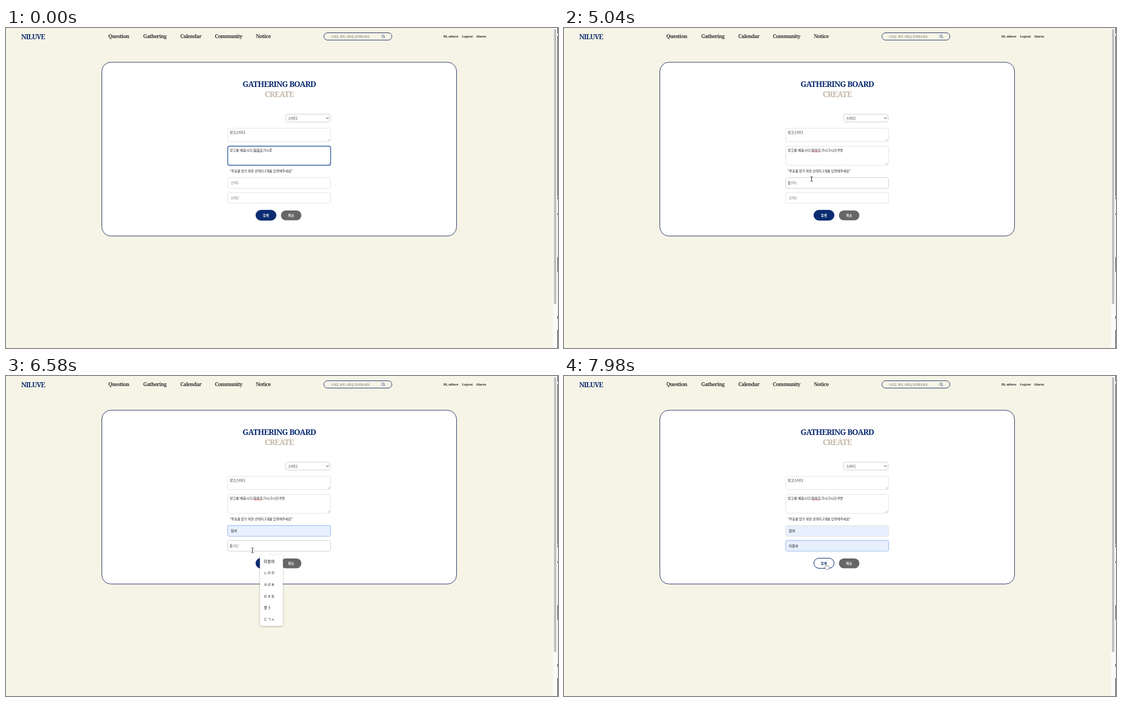
Recreate the animation shown at these times as an HTML page with a canvas. Size 982 by 570 pixels, loop 8000 ms.

```html
<!DOCTYPE html>
<html lang="ko">
<head>
<meta charset="utf-8">
<title>Gathering board</title>
<style>
html, body { margin: 0; width: 100%; height: 100%; overflow: hidden; background: #f6f4e6; }
canvas { display: block; width: 982px; height: 570px; }
</style>
</head>
<body>
<canvas id="stage" width="982" height="570"></canvas>
<script>
const ctx = document.getElementById('stage').getContext('2d');
const LOOP = 8000, STEP = 70;
const NAVY = '#0c2c72', INK = '#222', CREAM = '#f6f4e6', FILLED = '#e8f0fe';
const SANS = '"Noto Sans CJK KR", "Noto Sans CJK", "Noto Sans", sans-serif';
const SERIF = '"Noto Serif", serif';

const clamp = v => Math.max(0, Math.min(1, v));
const ramp = (t, from, span = 140) => clamp((t - from) / span);
const between = (t, a, b) => t >= a && t < b;

function box(x, y, w, h, r, fill, stroke, line = 1) {
  ctx.beginPath();
  ctx.roundRect(x, y, w, h, r);
  if (fill) { ctx.fillStyle = fill; ctx.fill(); }
  if (stroke) { ctx.strokeStyle = stroke; ctx.lineWidth = line; ctx.stroke(); }
}

function text(str, x, y, size, o = {}) {
  ctx.font = `${o.weight || 400} ${size}px ${o.font || SANS}`;
  ctx.letterSpacing = `${o.gap || 0}px`;
  ctx.textAlign = o.align || 'left';
  ctx.textBaseline = 'alphabetic';
  ctx.fillStyle = o.color || INK;
  ctx.fillText(str, x, y);
  const w = ctx.measureText(str).width;
  ctx.letterSpacing = '0px';
  return w;
}

function lines(points, color, width) {
  ctx.beginPath();
  points.forEach(([x, y], i) => i ? ctx.lineTo(x, y) : ctx.moveTo(x, y));
  ctx.strokeStyle = color;
  ctx.lineWidth = width;
  ctx.stroke();
}

function caret(x, y) {
  ctx.fillStyle = '#000';
  ctx.fillRect(x, y, 0.8, 7);
}

function header() {
  const bold = { font: SERIF, weight: 800 };
  text('NILUVE', 27, 20, 12, { ...bold, color: NAVY, gap: -0.9 });
  const nav = { Question: 182, Gathering: 244, Calendar: 310, Community: 371.5, Notice: 444.5 };
  for (const name in nav) text(name, nav[name], 18.3, 9, { ...bold, color: '#333', gap: -0.5 });
  box(565.5, 8.5, 121, 13, 6.5, null, '#2a3a72');
  text('닉네임, 제목, 내용을 검색해보세요', 578, 17.2, 4.9, { color: '#777' });
  ctx.beginPath();
  ctx.arc(670.7, 14.5, 2.2, 0, 7);
  ctx.strokeStyle = NAVY;
  ctx.lineWidth = 0.7;
  ctx.stroke();
  lines([[672.3, 16.1], [674.4, 18.2]], NAVY, 0.8);
  const user = { 'Hi, niluve': 778, Logout: 811, Alarm: 836 };
  for (const name in user) text(name, user[name], 17.2, 6, { font: SERIF, weight: 600, color: '#333', gap: -0.3 });
}

function scrollbar() {
  ctx.fillStyle = '#fafafa';
  ctx.fillRect(973, 0, 8, 570);
  box(974.7, 2, 4.3, 490, 2.2, '#c1c1c1');
  ctx.fillStyle = '#e6e6e6';
  ctx.fillRect(981, 0, 1, 570);
  ctx.fillStyle = '#333';
  for (const [y, h] of [[0, 10], [14, 286], [301, 4], [330, 3], [408, 26], [513, 5], [538, 32]])
    ctx.fillRect(981, y, 1, h);
}

function grip(x, y) {
  lines([[x - 4, y], [x, y - 4]], '#888', 0.6);
  lines([[x - 2, y], [x, y - 2]], '#888', 0.6);
}

function page() {
  ctx.fillStyle = CREAM;
  ctx.fillRect(0, 0, 982, 570);
  header();
  scrollbar();
  box(170.5, 61, 631, 309.5, 16, '#fff', '#2a3768');
  const title = { font: SERIF, weight: 800, align: 'center', gap: -0.8 };
  text('GATHERING BOARD', 486, 104.8, 14, { ...title, color: NAVY });
  text('CREATE', 486, 122.8, 14, { ...title, color: '#c6b8a8' });
  box(497.5, 153.5, 79, 14, 3, '#fff', '#ccd0d4');
  text('스터디', 502, 162.6, 6);
  lines([[569.5, 159.3], [571.8, 161.6], [574.1, 159.3]], '#333', 1);
  box(394.5, 178.5, 183, 24, 3, '#fff', '#e4e5e7');
  text('장고스터디', 398, 188.3, 6);
  grip(576, 201.5);
  text('*투표를 받기 위한 선택지 2개를 입력해주세요*', 398, 256.7, 5.85);
}

const typed = [
  [0, ''], [980, '2'], [1260, '2ㅅ'], [1330, '2시'], [1400, '2식'], [1540, '2시가'],
  [1680, '2시간'], [2240, '2시간/'], [3640, '2시간/8'], [3850, '2시간/8ㅁ'],
  [3920, '2시간/8며'], [4130, '2시간/8명']
];
const caretOff = [[140, 630], [2800, 3290], [4620, 5040]];

function detail(t) {
  const active = t < 5040;
  box(394.5, 210.5, 183, 34, 3, '#fff', active ? '#2f5c9f' : '#e4e5e7', active ? 1.4 : 1);
  grip(576, 243.5);
  const tail = typed.filter(([at]) => t >= at).pop()[1];
  const w = text('장고를 배웁시다/화목토/3시/' + tail, 398, 219.9, 6);
  ctx.fillStyle = active ? '#555' : '#d33c3c';
  ctx.fillRect(440.5, 220.4, 15.5, 0.7);
  if (active && !caretOff.some(([a, b]) => between(t, a, b))) caret(398.2 + w, 214);
}

function field(y, f) {
  if (f.focus > 0) box(393.4, y - 1.1, 185.2, 21.2, 4, `rgba(13,110,253,${0.25 * f.focus})`);
  const edge = f.focus > 0 ? '#a3c1ee' : f.caret ? '#ccd0d5' : '#e0e2e5';
  box(394.5, y + 0.5, 183, 19, 3, f.value ? FILLED : '#fff', edge);
  if (f.value) text(f.value, 400, y + (f.preview ? 11.8 : 12.4), f.preview ? 4.8 : 6, { color: '#111' });
  else text(f.hint, 400, y + 12.4, 6, { color: '#737a81' });
  if (f.caret) caret(399.6, y + 6.5);
}

function buttons(hover) {
  box(444.5, 324.5, 36, 18, 9, NAVY, NAVY);
  if (hover > 0) {
    ctx.globalAlpha = hover;
    box(445, 325, 35, 17, 8.5, '#fff');
    ctx.globalAlpha = 1;
  }
  const label = { weight: 700, align: 'center' };
  text('등록', 462.5, 335.6, 6, { ...label, color: hover > 0.5 ? NAVY : '#fff' });
  box(489, 325, 36.5, 17.5, 8.7, '#666');
  text('취소', 507.2, 335.6, 6, { ...label, color: '#fff' });
}

const ROW = 20.6;
const menus = [
  { from: 5110, to: 6020, top: 293.3, items: ['ㅌㅊㅍ', '참여', 'ㅇㄹㅎ', 'ㄴㅇㄹ', '호ㅓ', 'sdf'] },
  { from: 6580, to: 7560, top: 319.6, items: ['미참여', 'ㄴㅇㄹ', 'ㅇㄹㅎ', 'ㅌㅊㅍ', '호ㅓ', 'ㄷㄱㅅ'] }
];

function hovered(m, t, p) {
  if (!between(t, m.from, m.to) || p.x < 451.5 || p.x > 493) return -1;
  const i = Math.floor((p.y - m.top) / ROW);
  return i >= 0 && i < m.items.length ? i : -1;
}

function menu(m, hot) {
  ctx.save();
  ctx.shadowColor = 'rgba(0,0,0,.35)';
  ctx.shadowBlur = 3;
  ctx.shadowOffsetY = 0.7;
  box(451.7, m.top - 1, 41, 6 * ROW + 3, 2, '#fff');
  ctx.restore();
  ctx.beginPath();
  ctx.moveTo(458, m.top);
  ctx.lineTo(463.5, m.top - 5);
  ctx.lineTo(469, m.top);
  ctx.fillStyle = '#fff';
  ctx.fill();
  m.items.forEach((item, i) => {
    const y = m.top + i * ROW;
    if (i === hot) box(451.7, y + 0.3, 41, ROW, 0, '#e9e9e9');
    text(item, 458.6, y + 13.2, 7, { color: '#111' });
  });
}

// Pointer track: time, x, y
const track = [
  [4690, 444, 236], [4900, 440.5, 269], [5110, 440.5, 269], [5250, 446, 281], [5390, 461, 318],
  [5600, 463, 338.3], [5740, 463, 338.3], [5880, 465, 322], [6090, 465, 322], [6440, 440, 306],
  [6580, 438.5, 310.5], [6720, 442, 313], [6860, 460, 330], [6930, 464, 344], [7140, 466, 348],
  [7350, 471, 332], [7420, 471.7, 330], [7560, 471, 332], [7700, 465.6, 335.2]
];

function pointer(t) {
  const i = track.findIndex(k => k[0] > t);
  if (i < 0) return { x: 465.6, y: 335.2 };
  if (i === 0) return { x: -50, y: -50 };
  const [t0, x0, y0] = track[i - 1], [t1, x1, y1] = track[i];
  const k = (t - t0) / (t1 - t0), e = k * k * (3 - 2 * k);
  return { x: x0 + (x1 - x0) * e, y: y0 + (y1 - y0) * e };
}

const shapes = {
  arrow: new Path2D('M0 0V8.2L2 6.4L3.3 9.4L4.8 8.8L3.5 5.9H6.1Z'),
  hand: new Path2D('M0 .7Q1-.4 1.8.7V3.4L5.6 4.2Q6.4 4.6 6.2 5.6L5.3 8.8H.9L-1.7 5.7Q-1.5 4.6 0 5.2Z'),
  beam: new Path2D('M-2-4.3Q-.2-4.3 0-3.4Q.2-4.3 2-4.3M0-3.4V3.4M-2 4.3Q-.2 4.3 0 3.4Q.2 4.3 2 4.3')
};

function cursor(p, kind) {
  ctx.save();
  ctx.translate(p.x, p.y);
  const shape = shapes[kind];
  if (kind === 'beam') {
    ctx.strokeStyle = '#111';
    ctx.lineWidth = 0.9;
    ctx.stroke(shape);
  } else {
    ctx.strokeStyle = kind === 'hand' ? '#111' : '#fff';
    ctx.fillStyle = kind === 'hand' ? '#fff' : '#000';
    ctx.lineWidth = kind === 'hand' ? 0.9 : 1.2;
    ctx.stroke(shape);
    ctx.fill(shape);
  }
  ctx.restore();
}

function draw(now) {
  const t = Math.floor((now % LOOP) / STEP) * STEP;
  const p = pointer(t);
  const hot = menus.map(m => hovered(m, t, p));
  const pick = i => hot[i] >= 0 ? menus[i].items[hot[i]] : '';
  page();
  detail(t);
  field(266, {
    hint: '선택1', value: t >= 6020 ? '참여' : pick(0), preview: t < 6020,
    focus: ramp(t, 5040) - ramp(t, 6510), caret: between(t, 5040, 5530) && hot[0] < 0
  });
  field(292.5, {
    hint: '선택2', value: t >= 7560 ? '미참여' : pick(1), preview: t < 7560,
    focus: ramp(t, 6580) - ramp(t, 7910), caret: between(t, 6580, 7070) && hot[1] < 0
  });
  buttons(ramp(t, 7490, 210));
  menus.forEach((m, i) => { if (between(t, m.from, m.to)) menu(m, hot[i]); });

  const inField = y => p.y > y && p.y < y + 20;
  const kind = t >= 7560 ? 'hand'
    : hot[0] < 0 && hot[1] < 0 && (p.y < 260 || inField(266) || inField(292.5)) ? 'beam' : 'arrow';
  cursor(p, kind);
}

const start = performance.now();
function tick() {
  draw(performance.now() - start);
  requestAnimationFrame(tick);
}
tick();
</script>
</body>
</html>
```
